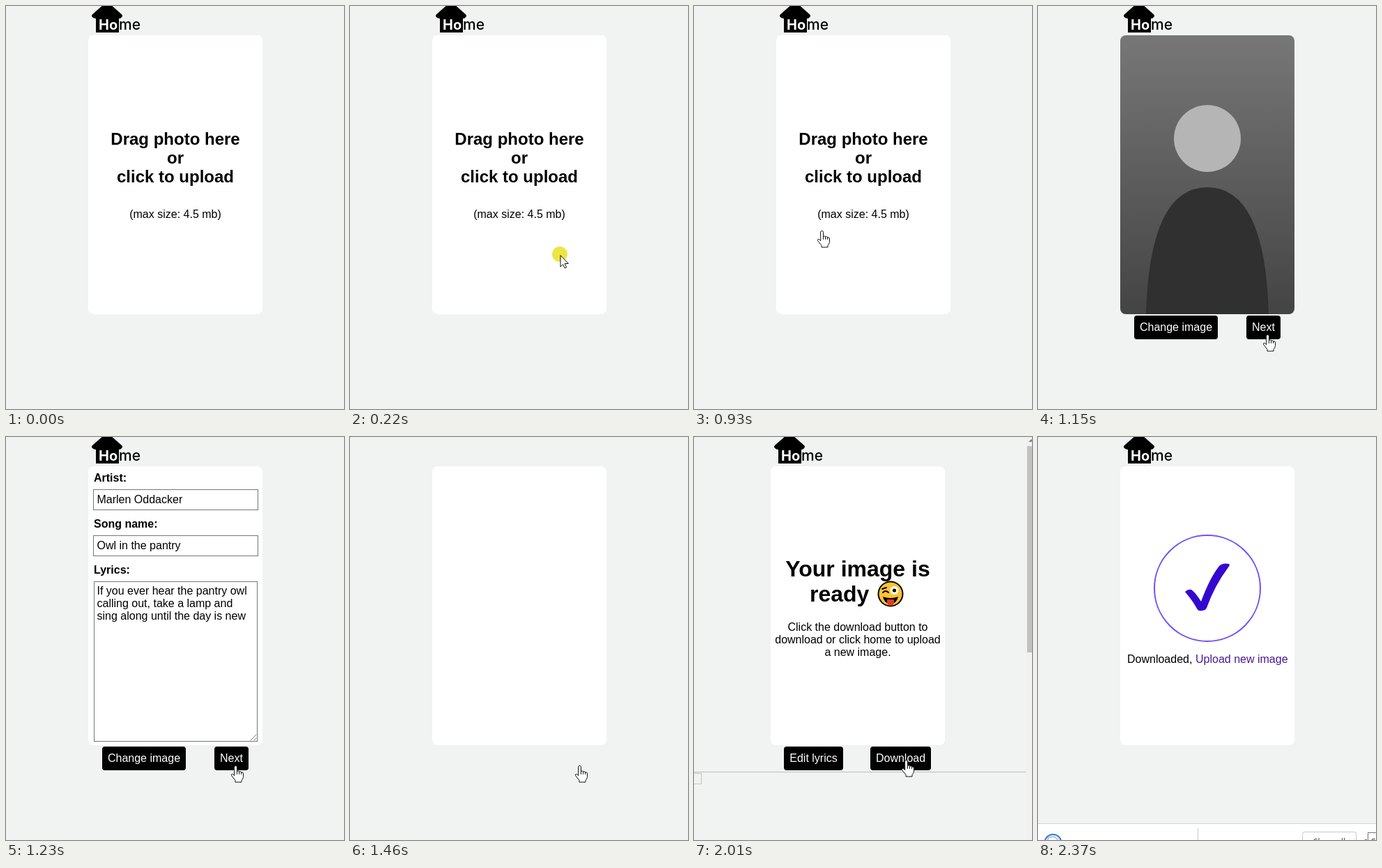
Animation of 485x578 px, one loop 2.53 s. Source, as an HTML page with a canvas:

```html
<!DOCTYPE html>
<html lang="en">
<head>
<meta charset="utf-8">
<title>Photo upload</title>
<style>
html, body { margin: 0; width: 100%; height: 100%; overflow: hidden; background: #f1f3f3; }
canvas { display: block; }
</style>
</head>
<body>
<canvas id="stage" width="485" height="578"></canvas>
<script>
const ctx = document.getElementById('stage').getContext('2d');
const LOOP = 2530;
const SANS = '"Liberation Sans", Arial, sans-serif';
const UI = '"Open Sans", "Noto Sans", sans-serif';

function text(str, x, y, font, color = '#000', align = 'left') {
  ctx.font = font;
  ctx.fillStyle = color;
  ctx.textAlign = align;
  ctx.fillText(str, x, y);
}

function lines(list, x, y, step, font, align) {
  list.forEach((str, i) => text(str, x, y + i * step, font, '#000', align));
}

function rect(x, y, w, h, color) {
  ctx.fillStyle = color;
  ctx.fillRect(x, y, w, h);
}

function frame(x, y, w, h, color = '#767676', fill = '#fff') {
  rect(x, y, w, h, color);
  rect(x + 1, y + 1, w - 2, h - 2, fill);
}

function round(x, y, w, h, r, color) {
  ctx.beginPath();
  ctx.roundRect(x, y, w, h, r);
  ctx.fillStyle = color;
  ctx.fill();
}

function disc(x, y, r, color) {
  ctx.beginPath();
  ctx.arc(x, y, r, 0, 7);
  ctx.fillStyle = color;
  ctx.fill();
}

function shape(d, x, y, fill, stroke, width = 1) {
  const path = new Path2D(d);
  ctx.save();
  ctx.translate(x, y);
  ctx.lineJoin = ctx.lineCap = 'round';
  if (fill) { ctx.fillStyle = fill; ctx.fill(path); }
  if (stroke) { ctx.strokeStyle = stroke; ctx.lineWidth = width; ctx.stroke(path); }
  ctx.restore();
}

function hand(x, y) {
  shape('M-2 2Q-2 0 0 0Q2 0 2 2V8Q4 6.5 5 8.5Q7.5 7.5 8 9.5Q11 8.5 11 11.5V16Q10.5 19 8.5 21V23.5H-.5V21L-6 14Q-6.5 11.5-4 12L-2 14Z', x, y, '#fff', '#111');
  shape('M2 8V12M5 8.5V12M8 9.5V12', x, y, null, '#111');
}

function arrow(x, y) {
  shape('M0 0V16L3.7 12.6L6.2 18L8.6 17L6.2 11.5H11Z', x, y, '#fff', '#111');
}

function home() {
  shape('M145-5Q147-5 149-3L166 12Q168 14 166 16Q165 18 162 18V38H129V18Q126 18 124 16Q122 14 124 12L141-3Q143-5 145-5Z', 0, 0, '#000');
  text('Ho', 133, 34, '700 20px Inter, sans-serif', '#fff');
  text('me', 162, 34, '500 21px Inter, sans-serif');
}

function panel() {
  round(118, 42, 250, 400, 8, '#fff');
}

function button(label, x, w) {
  round(x, 444, w, 34, 4, '#000');
  text(label, x + w / 2, 466, '16px ' + SANS, '#fff', 'center');
}

function uploadPage() {
  home();
  panel();
  lines(['Drag photo here', 'or', 'click to upload'], 243, 199, 27, 'bold 24px ' + SANS, 'center');
  text('(max size: 4.5 mb)', 243, 304, '16px ' + SANS, '#000', 'center');
}

function photoButtons() {
  button('Change image', 138, 120);
  button('Next', 299, 49);
}

function previewPage() {
  home();
  ctx.save();
  ctx.beginPath();
  ctx.roundRect(118, 42, 250, 400, 8);
  ctx.clip();
  const tone = ctx.createLinearGradient(0, 42, 0, 442);
  tone.addColorStop(0, '#777');
  tone.addColorStop(1, '#444');
  rect(118, 42, 250, 400, tone);
  disc(243, 190, 48, '#b5b5b5');
  shape('M155 442Q160 260 243 260Q326 260 331 442Z', 0, 0, '#303030');
  ctx.restore();
  photoButtons();
}

function formPage() {
  home();
  panel();
  const body = '16px ' + SANS;
  ['Artist:', 'Song name:', 'Lyrics:'].forEach((s, i) => text(s, 126, 64 + i * 66, 'bold ' + body));
  ['Marlen Oddacker', 'Owl in the pantry'].forEach((s, i) => {
    frame(125, 75 + i * 66, 237, 30);
    text(s, 130.5, 95 + i * 66, body);
  });
  frame(126, 207, 235, 230);
  lines(['If you ever hear the pantry owl', 'calling out, take a lamp and', 'sing along until the day is new'], 130.5, 226, 18, body);
  shape('M351 435L359 427M356 435L359 432', 0, 0, null, '#777');
  photoButtons();
}

function emoji(x, y) {
  disc(x, y, 18.5, '#000');
  disc(x, y, 16.5, '#ffc431');
  disc(x + 5.5, y - 5, 6, '#fff');
  disc(x + 5.5, y - 5, 2.6, '#000');
  shape('M-11-2Q-7-6-3-2M-12-7L-6-9', x, y, null, '#000', 2);
  shape('M-11 4Q0 8 11 4Q9 14 0 14Q-9 14-11 4Z', x, y, '#000');
  shape('M-5 8H5V13Q4 17 0 17Q-4 17-5 13Z', x, y, '#e33b1e');
}

function readyPage(shift = 0) {
  ctx.save();
  ctx.translate(-shift, 0);
  home();
  panel();
  text('Your image is', 243, 200, 'bold 32px ' + SANS, '#000', 'center');
  text('ready', 174, 236, 'bold 32px ' + SANS);
  emoji(290, 225);
  lines(['Click the download button to', 'download or click home to upload', 'a new image.'], 243, 278, 18, '16px ' + SANS, 'center');
  button('Edit lyrics', shift ? 137 : 138, shift ? 85 : 84);
  button('Download', 261, 87);
  ctx.restore();
}

function scrollbar() {
  rect(476, 0, 9, 578, '#f1f1f1');
  rect(478, 13, 7, 296, '#c1c1c1');
  shape('M480 7L484 3L488 7Z', 0, 0, '#888');
  rect(0, 480, 476, 1, '#bdbdbd');
  frame(-1, 482, 12, 16, '#c4c4c4', '#f1f3f3');
}

function donePage(ring, tick) {
  home();
  panel();
  ctx.beginPath();
  ctx.arc(243, 217, 76, -Math.PI / 2, Math.PI * (2 * ring - 0.5));
  ctx.strokeStyle = '#7350f5';
  ctx.lineWidth = 2;
  ctx.stroke();
  if (tick) {
    ctx.save();
    ctx.beginPath();
    ctx.rect(205, 175, 75 * tick, 80);
    ctx.clip();
    shape('M211 222Q215 218 220 219Q226 223 234 236Q246 203 260 185Q265 180 274 182Q276 183 273 187Q254 212 242 245Q240 249 235 249Q230 250 228 246Q222 235 211 222Z', 0, 0, '#3508d0');
    ctx.restore();
  }
  const font = '16px ' + SANS;
  text('Downloaded, ', 128, 324, font);
  text('Upload new image', 226, 324, font, '#4a1a91');
}

function downloadBar(y) {
  ctx.save();
  ctx.translate(0, y - 554);
  rect(0, 554, 485, 60, '#fff');
  rect(0, 554, 485, 1, '#d2d4d4');
  rect(229, 561, 1, 30, '#c8c8c8');
  disc(21.5, 582, 13, '#3878d0');
  disc(21.5, 582, 11, '#dceafc');
  shape('M15 574H24L28 578V592H15Z', 0, 0, '#fff', '#8aa5c8');
  round(379, 566, 78, 30, 4, '#c9c9c9');
  round(380, 567, 76, 28, 3, '#fff');
  text('Show all', 418, 585, '12px ' + UI, '#444', 'center');
  frame(473, 567, 20, 20, '#777');
  text('S', 478, 585, '12px ' + UI, '#333');
  rect(469, 577, 3, 1, '#777');
  ctx.restore();
}

// Cursor path of the dragged file: time, x, y
const drag = [[70, 336, 367], [150, 302, 358], [230, 264, 349], [310, 228, 339], [390, 199, 331], [470, 181.5, 325.5], [540, 183.5, 321.5]];

function dragged(t) {
  const [start, x, y] = drag.filter(k => k[0] <= t).pop();
  if (start >= 230) {
    ctx.globalAlpha = 0.85;
    rect(x - 9.5, y - 19.5, 19, 29, '#3c3c3c');
    disc(x - 1, y - 12, 4, '#c9c9c9');
    ctx.globalAlpha = 1;
    ctx.save();
    ctx.shadowColor = '#000';
    ctx.shadowBlur = 2;
    ctx.shadowOffsetX = ctx.shadowOffsetY = 1;
    text('owl-in', x - 29, y + 28, '12px ' + UI, '#fff');
    ctx.restore();
  }
  disc(x - 1, y - 2, 11, 'rgba(232,222,20,.8)');
  if (start >= 230) {
    const left = Math.round(x + 10), top = Math.round(y + 13);
    frame(left, top, 57, 20);
    shape('M3 10H14M9.5 5.5L14 10L9.5 14.5', left, top, null, '#2450b8', 1.3);
    text('Move', left + 20, top + 14, '12px ' + UI, '#2547a8');
  }
  arrow(x, y);
}

function draw(t) {
  rect(0, 0, 485, 578, '#f1f3f3');
  if (t < 1000) {
    uploadPage();
    if (t >= 720) hand(183.5, 322.5);
    else if (t >= 620) arrow(183.5, 321.5);
    else if (t >= 70) dragged(t);
  } else if (t < 1230) {
    previewPage();
    if (t < 1150) hand(183.5, 322.5);
    else hand(329.5, 471.5);
  } else if (t < 2010) {
    if (t < 1460) formPage();
    else if (t < 1610) panel();
    else readyPage();
    hand(329.5, 471.5);
  } else if (t < 2160) {
    readyPage(8);
    scrollbar();
    hand(304.5, 463.5);
  } else {
    const step = Math.min(3, Math.floor((t - 2160) / 70));
    donePage([0.4, 0.8, 1, 1][step], [0, 0, 0.5, 1][step]);
    if (step > 0) downloadBar([578, 570, 560, 554][step]);
  }
}

const begin = performance.now();
function tick() {
  draw((performance.now() - begin) % LOOP);
  requestAnimationFrame(tick);
}
tick();
</script>
</body>
</html>
```
